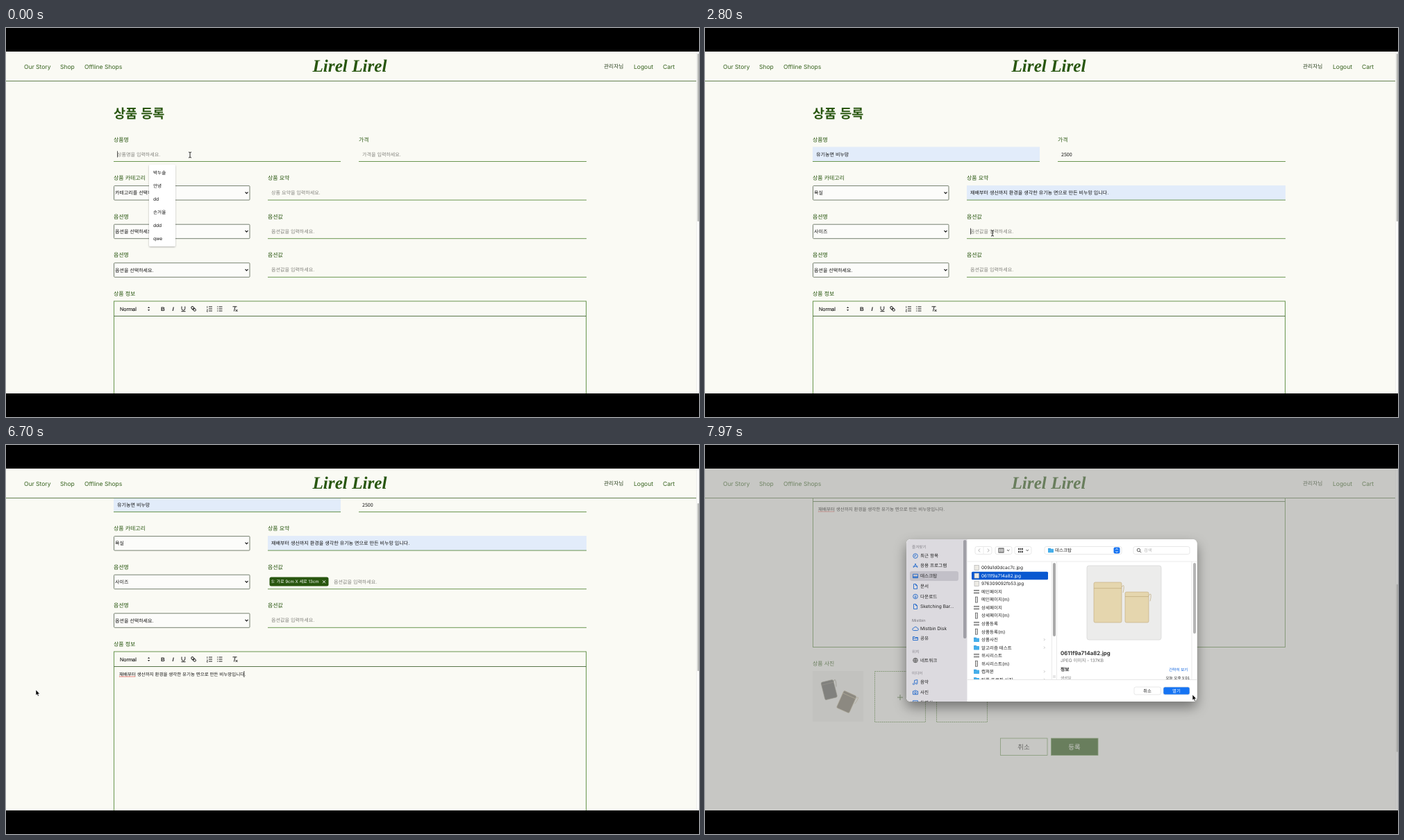
An HTML page that plays this animation: 998x561 px, repeating every 8000 ms.

```html
<!DOCTYPE html>
<html lang="ko">
<head>
<meta charset="utf-8">
<title>상품 등록</title>
<style>
  html, body { margin: 0; width: 100%; height: 100%; overflow: hidden; background: #000; }
  svg { display: block; width: 100%; height: 100%; text-rendering: geometricPrecision; }
  text { white-space: pre; }
</style>
</head>
<body>
<svg id="stage" viewBox="0 0 998 561"></svg>
<script>
const LOOP = 8000;
const KR = "'Noto Sans CJK KR', 'Noto Sans CJK JP', sans-serif";
const UI = "Inter, 'Noto Sans CJK KR', sans-serif";
const GREEN = '#28560f', LINE = '#6a9650', PAPER = '#fafaf4', BLUE = '#0a60dc';
const stage = document.getElementById('stage');
const ruler = document.createElement('canvas').getContext('2d');

// Drawing helpers; text is placed by its vertical centre.
const text = (x, y, str, size = 7, fill = '#111', { font = KR, weight = 400, anchor = 'start', extra = '' } = {}) =>
  `<text x="${x}" y="${y + size * .36}" font-size="${size}" fill="${fill}" font-family="${font}" font-weight="${weight}" text-anchor="${anchor}" ${extra}>${str}</text>`;
const rect = (x, y, w, h, fill = 'none', extra = '') =>
  `<rect x="${x}" y="${y}" width="${w}" height="${h}" fill="${fill}" ${extra}/>`;
const path = (d, stroke = '#222', width = 1, extra = '') =>
  `<path d="${d}" fill="none" stroke="${stroke}" stroke-width="${width}" ${extra}/>`;
const at = (x, y, body) => `<g transform="translate(${x} ${y})">${body}</g>`;
const textWidth = (str, size) => { ruler.font = `${size}px ${KR}`; return ruler.measureText(str).width; };
const caret = (x, y) => path(`M${x} ${y - 4.5}v9`, '#222', .8);
const ease = k => k * k * (3 - 2 * k);
const clamp01 = k => Math.min(1, Math.max(0, k));

// Successive screen states while typing Hangul with a two-set keyboard.
const LEADS = 'ㄱㄲㄴㄷㄸㄹㅁㅂㅃㅅㅆㅇㅈㅉㅊㅋㅌㅍㅎ';
const TAILS = 'ㄱㄲㄳㄴㄵㄶㄷㄹㄺㄻㄼㄽㄾㄿㅀㅁㅂㅄㅅㅆㅇㅈㅊㅋㅌㅍㅎ';
function keystrokes(str) {
  const states = [];
  let done = '', open = false;
  for (const ch of str) {
    const n = ch.charCodeAt(0) - 0xAC00;
    if (n < 0 || n > 11171) { states.push(done + ch); open = false; }
    else {
      const lead = LEADS[Math.floor(n / 588)], tail = n % 28;
      const borrowed = TAILS.indexOf(lead) + 1;
      states.push(open && borrowed
        ? done.slice(0, -1) + String.fromCharCode(done.charCodeAt(done.length - 1) + borrowed)
        : done + lead);
      states.push(done + String.fromCharCode(0xAC00 + n - tail));
      if (tail) states.push(done + ch);
      open = !tail;
    }
    done += ch;
  }
  return states;
}
const typedAt = (states, t, start, step) =>
  t < start ? '' : states[Math.min(states.length - 1, Math.floor((t - start) / step))];

const SUMMARY = '재배부터 생산까지 환경을 생각한 유기농 면으로 만든 비누망 입니다.';
const SIZE = 'S: 가로 9cm X 세로 13cm';
const storyKeys = keystrokes(SUMMARY.replace(' 입', '입'));
const sizeKeys = keystrokes(SIZE);
const priceKeys = keystrokes('2500');

// time, x, y, pointer: I = text beam, A = arrow, - = hidden
const POINTER = [
  [0, 265, 183, 'I'], [300, 265, 183, 'A'], [430, 226, 209, 'A'], [620, 226, 209, 'A'],
  [920, 528, 180, 'I'], [1400, 528, 180, 'A'], [1580, 250, 238, 'A'], [1850, 230, 250, 'A'],
  [2030, 430, 238, 'I'], [2300, 430, 240, 'A'], [2430, 250, 293, 'A'], [2600, 250, 296, 'A'],
  [2740, 414, 296, 'I'], [2900, 414, 296, '-'], [3800, 414, 296, 'I'], [4200, 414, 300, 'I'],
  [4400, 320, 340, 'I'], [4800, 320, 340, '-'], [6590, 150, 345, 'A'], [6670, 43, 353, 'A'],
  [6830, 43, 353, 'A'], [6950, 191, 364, 'A'], [7030, 191, 364, 'A'], [7150, 440, 177, 'A'],
  [7260, 440, 177, 'A'], [7400, 680, 354, 'A'], [7450, 680, 354, 'A'], [7580, 280, 364, 'A'],
  [7650, 280, 364, 'A'], [7760, 430, 188, 'A'], [7800, 430, 188, 'A'], [7900, 682, 354, 'A'],
  [7970, 702, 360, 'A'], [8000, 702, 360, 'A']
];
function pointer(t) {
  const i = POINTER.findIndex((p, n) => t >= p[0] && t < POINTER[n + 1][0]);
  const [t0, x0, y0, kind] = POINTER[i], [t1, x1, y1] = POINTER[i + 1];
  if (kind === '-') return '';
  const k = ease((t - t0) / (t1 - t0));
  const shape = kind === 'I'
    ? path('M-2-4Q0-4 0-3Q0-4 2-4M0-3V3M-2 4Q0 4 0 3Q0 4 2 4', '#111', .9)
    : '<path d="M0 0V8L1.8 6.4L3 9.2L4.4 8.6L3.2 5.9H5.6Z" fill="#000" stroke="#fff" stroke-width=".6"/>';
  return at(x0 + (x1 - x0) * k, y0 + (y1 - y0) * k, shape);
}

function header() {
  const nav = (x, s) => text(x, 55.5, s, 8.5, '#37631f', { font: UI });
  return rect(0, 34, 998, 43, PAPER) + path('M0 76.5H994', '#648052', 1) +
    nav(26, 'Our Story') + nav(78, 'Shop') + nav(113, 'Offline Shops') + nav(904, 'Logout') + nav(946, 'Cart') +
    text(861, 55.5, '관리자님', 7.7, '#2c4320', { weight: 500 }) +
    text(495, 54, 'Lirel Lirel', 25.2, GREEN,
      { font: "'Liberation Serif', serif", weight: 700, anchor: 'middle', extra: 'font-style="italic"' });
}

const label = (x, y, s) => text(x, y, s, 7.9, GREEN, { weight: 500 });
function field(x, y, w, { hint, value = '', filled, focus, indent = 5 }) {
  const shown = value || hint;
  return (filled ? rect(x, y - 10.5, w, 21, '#e2ecfa') : '') +
    path(`M${x} ${y + 10.5}h${w}`, LINE, 1) +
    text(x + indent, y, shown, 7.05, value ? '#111' : '#85857f') +
    (focus ? caret(x + indent + .5 + textWidth(value, 7.05), y) : '');
}
const select = (y, s) =>
  rect(155.5, y - 10, 195.5, 20.5, '#fcfcfa', 'stroke="#768070" rx="1"') +
  text(157, y + .3, s, 7, '#111') + path(`M344.5 ${y - 1}l2 2l2-2`, '#111', 1.2);

function toolbar() {
  const icon = (x, s, extra) =>
    text(x, 405, s, 8, '#222', { font: "'Liberation Sans', sans-serif", weight: 700, anchor: 'middle', extra });
  const list = x => path(`M${x + 3} 402h5M${x + 3} 405h5M${x + 3} 408h5`, '#222', 1);
  return rect(155.5, 394, 680, 231.5, 'none', `stroke="${LINE}"`) +
    path('M155 415.5H836', '#59764a', 1) +
    text(164, 405, 'Normal', 7.4, '#222', { font: "'Liberation Sans', sans-serif", extra: 'stroke="#222" stroke-width=".15"' }) +
    '<path d="M204 404l1.6-2l1.6 2zM204 406l1.6 2l1.6-2z" fill="#222"/>' +
    icon(226, 'B') + icon(240.5, 'I', 'font-style="italic"') +
    path('M253 401.5v3.2q0 2.5 2.4 2.5t2.4-2.5v-3.2M252.5 408.7h6') +
    `<g transform="rotate(45 270 405)">${rect(266, 403.3, 4.5, 3.2, 'none', 'rx="1.6" stroke="#222"')}${rect(269.5, 403.3, 4.5, 3.2, 'none', 'rx="1.6" stroke="#222"')}</g>` +
    list(289) + path('M289.8 401v3M289 406h1.5l-1.5 3h2', '#222', .7) +
    list(303.5) + path('M304 402h1.2M304 405h1.2M304 408h1.2', '#222', 1.2) +
    path('M326.5 401.8h6M330 402l-1.6 6.5M330.5 406l3 3m0-3l-3 3');
}

function story(t) {
  const s = typedAt(storyKeys, t, 4850, 22);
  const busy = t < 4850 + storyKeys.length * 22 && /[^ .]$/.test(s);
  const end = 163 + textWidth(s, 6.5);
  const last = busy ? textWidth(s.slice(-1), 6.5) : 0;
  return text(163, 426.5, s, 6.5, '#111') +
    (busy ? path(`M${end - last} 430h${last}`, '#111', .7) : '') +
    (s.includes(' ') ? path('M163 430h23.5', '#e0342c', 1.1, 'stroke-dasharray="1.3 .8"') : '') +
    (!busy && t > 4450 && t < 6950 ? caret(end + .5, 426.5) : '');
}

const pouch = (x, y, w, h, fill, edge) =>
  rect(x, y, w, h, fill, `rx="2" stroke="${edge}" stroke-width=".6"`) +
  path(`M${x} ${y + h * .15}h${w}M${x + w} ${y + h * .12}q4-6 3 3l-1 5`, edge, .7);
const darkPouches = () =>
  `<g transform="rotate(-14 24 28)">${pouch(15, 14, 18, 26, '#5d5d58', '#8b8774')}</g>` +
  `<g transform="rotate(24 49 44)">${pouch(39, 31, 20, 27, '#77705f', '#c3b893')}</g>`;

function page(t) {
  const photo = t >= 7450;
  const tagged = t >= 3730;
  const drop = photo ? 2 : 0;
  const box = x => rect(x + .5, 660.5, 73, 73, 'none', `stroke="${LINE}" stroke-dasharray="2 1"`) +
    path(`M${x + 33} 698h8m-4-4v8`, '#55793f', 1);
  const button = (x, s, fill, color) =>
    rect(x + .5, 755 + drop, 67.5, 24.5, fill, `stroke="${LINE}" stroke-width=".8"`) +
    text(x + 34, 767.5 + drop, s, 9.4, color, { anchor: 'middle' });
  return text(155, 123.5, '상품 등록', 18.5, GREEN, { weight: 700 }) +
    label(155, 161, '상품명') + label(508, 161, '가격') +
    field(155, 182, 327, { hint: '상품명을 입력하세요.', value: t >= 600 ? '유기농면 비누망' : '', filled: t >= 600, focus: t < 900 }) +
    field(508, 182, 328, { hint: '가격을 입력하세요.', value: typedAt(priceKeys, t, 1150, 70), focus: t >= 920 && t < 1580 }) +
    label(155, 216.5, '상품 카테고리') + label(377, 216.5, '상품 요약') +
    select(237.6, t >= 1850 ? '욕실' : '카테고리를 선택하세요.') +
    field(377, 237.6, 459, { hint: '상품 요약을 입력하세요.', value: t >= 2270 ? SUMMARY : '', filled: t >= 2270, focus: t >= 2030 && t < 2430 }) +
    label(155, 272, '옵션명') + label(377, 272, '옵션값') +
    select(293.2, t >= 2600 ? '사이즈' : '옵션을 선택하세요.') +
    field(377, 293.2, 459, {
      hint: '옵션값을 입력하세요.', value: tagged ? '' : typedAt(sizeKeys, t, 2920, 28),
      focus: t >= 2740 && t < 4400, indent: tagged ? 95 : 5
    }) +
    (tagged ? rect(379.5, 286.5, 85, 13, GREEN, 'rx="2.5"') +
      text(382, 292.7, SIZE, 6.1, '#fff', { font: UI }) + path('M456 291.3l4 4m0-4l-4 4', '#fff', .9) : '') +
    label(155, 327.6, '옵션명') + label(377, 327.6, '옵션값') +
    select(348.8, '옵션을 선택하세요.') + field(377, 348.8, 459, { hint: '옵션값을 입력하세요.' }) +
    label(155, 383, '상품 정보') + toolbar() + story(t) +
    label(155, 649.5, '상품 사진') +
    (photo ? at(155, 660, rect(0, 0, 73, 73, '#eeeeea') + darkPouches()) : box(155)) + box(244) + box(333) +
    button(425, '취소', PAPER, '#222') + button(498, '등록', '#28560f', '#fff');
}

function suggestions(x, w, items) {
  return rect(x, 197, w, 118, '#fff', 'rx="2" filter="url(#soft)"') +
    items.map((s, i) => text(x + 6, 209 + i * 18.85, s, 6.6, '#111', { font: UI })).join('');
}

const ICONS = {
  clock: 'M3.3 0A3.3 3.3 0 1 1 -3.3 0A3.3 3.3 0 1 1 3.3 0M0-2V.3H-1.8',
  apps: 'M-3 3L.6-3M3 3L-.6-3M-3.5 1h7',
  desk: 'M-3.5-2.7h7v5.4h-7zM-3.5 1h7M-3.5 1.7h7',
  doc: 'M-2.5-3.5h3l2 2v5h-5zM.5-3.5v2h2',
  down: 'M3.3 0A3.3 3.3 0 1 1 -3.3 0A3.3 3.3 0 1 1 3.3 0M0-1.8V1.7M-1.4.4L0 1.8L1.4.4',
  cloud: 'M-2.5 2.5h5a1.7 1.7 0 0 0 .2-3.4a2.6 2.6 0 0 0-4.9-.2a1.8 1.8 0 0 0-.3 3.6z',
  folder: 'M-3.5-2.5h2.5l1 1h3.5v4h-7zM-3.5-.3h7',
  globe: 'M3.3 0A3.3 3.3 0 1 1 -3.3 0A3.3 3.3 0 1 1 3.3 0M-3.3 0h6.6M0-3.3v6.6M-2.6-1.8h5.2M-2.6 1.8h5.2',
  note: 'M-1.3 2.6V-2.6L2.8-3.4V1.8M-1.3 2.6a1.2 1 0 1 1-1.2-1M2.8 1.8a1.2 1 0 1 1-1.2-1',
  camera: 'M-3.5-2h1.8l.8-1h1.8l.8 1h1.8v4.7h-7zM1.4.3A1.4 1.4 0 1 1-1.4.3A1.4 1.4 0 1 1 1.4.3'
};
const SIDEBAR = [
  [147, '즐겨찾기'], [160, '최근 항목', 'clock'], [174, '응용 프로그램', 'apps'], [189, '데스크탑', 'desk'],
  [204, '문서', 'doc'], [218.5, '다운로드', 'down'], [233, 'Sketching Bar...', 'doc'],
  [253, 'Mistbin'], [265, 'Mistbin Disk', 'cloud'], [279, '공유', 'folder'],
  [298, '위치'], [310.5, '네트워크', 'globe'],
  [329, '미디어'], [342, '음악', 'note'], [357, '사진', 'camera'], [371.5, '동영상', 'desk']
];
// A trailing slash marks a folder.
const FILES = ['009a1d0dcac7c.jpg', '0611f9a714a82.jpg', '976309092fb53.jpg', '메인페이지', '메인페이지(m)',
  '상세페이지', '상세페이지(m)', '상품등록', '상품등록(m)', '상품사진/', '알고리즘 테스트/',
  '위시리스트', '위시리스트(m)', '캡쳐본/', '팀플 프로필 사진/'];

const folder = (x, y) => rect(x - 4, y - 3, 4, 2, '#2d8fd2') + rect(x - 4, y - 2.2, 8, 5.4, '#45aeea', 'rx=".6"');
function fileIcon(y, name) {
  if (name.endsWith('/')) return folder(391, y);
  if (name.endsWith('.jpg')) return rect(388, y - 3.5, 6.5, 7, '#eceae4', 'stroke="#aaa" stroke-width=".6"');
  return name.endsWith('(m)')
    ? rect(389.5, y - 4, 3, 8, '#ddd', 'stroke="#555" stroke-width=".7"')
    : rect(387, y - 2, 8, 4, '#ddd') + path(`M387 ${y - 2}h8M387 ${y + 2}h8`, '#444', .9);
}

function sidebar() {
  return rect(290, 136, 87.5, 234, '#dcdadf') + rect(295, 182, 70, 14, '#c2c0c8', 'rx="3"') +
    SIDEBAR.map(([y, s, icon]) => icon
      ? at(303, y, path(ICONS[icon], icon === 'globe' ? '#666' : '#2269cb', .9)) + text(310, y, s, 6.6, '#222', { font: UI })
      : text(298, y, s, 5.6, '#85838a', { font: UI, weight: 500 })).join('') +
    rect(372, 137, 4.5, 142, '#a09fa6', 'rx="2"');
}

function preview(index) {
  const name = FILES[index];
  const picture = index
    ? pouch(560, 198, 40, 58, '#e5d6ae', '#bfa97a') + pouch(605, 212, 34, 44, '#e5d6ae', '#bfa97a')
    : at(562, 185, `<g transform="scale(1.2)">${darkPouches()}</g>`);
  return rect(550, 174, 107, 107, '#ececeb', 'rx="3" stroke="#d4d4d4" stroke-width=".7"') + picture +
    text(512, 300, name, 7.9, '#222', { font: UI, weight: 600 }) +
    text(512, 311, 'JPEG 이미지 - 137KB', 6.5, '#777', { font: UI }) +
    text(512, 323.7, '정보', 6.8, '#222', { weight: 700 }) +
    text(695.5, 324, '간략히 보기', 5.6, BLUE, { anchor: 'end' }) +
    text(512, 335.5, '생성일', 5.6, '#777') +
    text(698, 335.5, '오늘 오후 9:01', 5.6, '#222', { anchor: 'end' }) +
    path('M701 168V338', '#e4e4e4', .8) + rect(703, 170, 4, 102, '#b5b5b5', 'rx="2"');
}

function dialog(selected) {
  const picked = selected >= 0;
  const rows = FILES.map((name, i) => {
    const y = 177 + i * 11.52, on = i === selected;
    return (on ? rect(384, y - 5.7, 110, 11.4, '#0958d0', 'rx="1.5"') : '') + fileIcon(y, name) +
      text(398, y, name.replace('/', ''), 6.5, on ? '#fff' : '#222', { font: UI }) +
      (name.endsWith('/') ? path(`M488 ${y - 1.5}l1.5 1.5l-1.5 1.5`, '#aaa', .7) : '');
  }).join('');
  const pill = (x, y, w, h, fill = '#fff') => rect(x, y, w, h, fill, 'rx="2.5" stroke="#dedede" stroke-width=".7"');
  const chevron = x => path(`M${x} 151l1.7 1.7l1.7-1.7`, '#444', 1);
  return rect(290, 136, 418.5, 234, '#fff', 'rx="6" filter="url(#deep)"') +
    `<g clip-path="url(#dialogClip)">${rect(290, 136, 419, 235, '#fff')}${sidebar()}` +
    pill(389, 146.5, 24, 11) + path('M401 147v10', '#e2e2e2', .7) +
    path('M396 149.5l-2.2 2.5l2.2 2.5M407 149.5l2.2 2.5l-2.2 2.5', '#aaa', .9) +
    pill(418, 146.5, 24, 11) + rect(423, 149, 7, 6, 'none', 'stroke="#444"') + path('M425.3 149v6M427.7 149v6', '#444', .8) + chevron(435) +
    pill(446, 146.5, 24, 11) + path('M451 150h7M451 154h7', '#444', 2.3, 'stroke-dasharray="1.8 .8"') + chevron(462.5) +
    pill(489, 146.5, 111, 11) + folder(498, 152) + text(504, 152, '데스크탑', 6.5, '#222') +
    rect(588.5, 147.5, 9, 9, '#1874f2', 'rx="2"') + path('M591.4 151l1.6-1.7l1.6 1.7M591.4 153l1.6 1.7l1.6-1.7', '#fff', .9) +
    pill(617, 146.5, 81, 11) + `<circle cx="624.5" cy="151.5" r="2.2" fill="none" stroke="#444" stroke-width=".9"/>` +
    path('M626.2 153.2l2 2', '#444', .9) + text(632, 152, '검색', 6.3, '#b5b5b5') +
    path('M378 168H709', '#e7e7e7', .8) +
    `<g clip-path="url(#listClip)">${rows}${path('M499.5 168V338M506.5 168V338', '#e4e4e4', .8)}${rect(501, 170, 4, 106, '#aaa', 'rx="2"')}` +
    path('M502 332v4M504 332v4', '#bbb', .7) +
    (picked ? preview(selected) : path('M627.5 168V338M635 168V338', '#e4e4e4', .8)) + '</g>' +
    path('M378 338.5H709', '#e0e0e0', .8) +
    pill(618, 349, 38.5, 11) + text(637, 354.3, '취소', 6.4, '#222', { anchor: 'middle' }) +
    pill(660, 349, 38, 11, picked ? '#1674f3' : '#fafafa') +
    text(679, 354.3, '열기', 6.4, picked ? '#fff' : '#b8b8b8', { anchor: 'middle' }) + '</g>';
}

const DEFS = `<defs>
  <clipPath id="pageClip"><rect x="0" y="77" width="998" height="450"/></clipPath>
  <clipPath id="dialogClip"><rect x="290" y="136" width="418.5" height="234" rx="6"/></clipPath>
  <clipPath id="listClip"><rect x="378" y="168" width="331" height="170"/></clipPath>
  <filter id="soft" x="-30%" y="-20%" width="160%" height="140%"><feDropShadow dx="0" dy="1" stdDeviation="1.2" flood-opacity=".3"/></filter>
  <filter id="deep" x="-20%" y="-20%" width="140%" height="150%"><feDropShadow dx="0" dy="8" stdDeviation="9" flood-opacity=".42"/></filter>
</defs>`;

function draw() {
  const t = performance.now() % LOOP;
  const scroll = 96 * ease(clamp01((t - 3930) / 200)) + 238 * ease(clamp01((t - 6710) / 130));
  const first = t >= 7030 && t < 7450, second = t >= 7650;
  let out = DEFS + rect(0, 34, 998, 493, PAPER) +
    `<g clip-path="url(#pageClip)">${at(0, -scroll, page(t))}</g>` + header() +
    rect(994, 34, 4, 493, '#fcfcfb') + path('M994.5 34V527', '#e9e9e6', .7) +
    rect(995.7, 37 + scroll * .49, 2.3, 242, '#b9bab7', 'rx="1"');
  if (t < 550) out += suggestions(206, 38, ['박누솔', '안녕', 'dd', '손거울', 'ddd', 'qwe']);
  if (t >= 920 && t < 1150) out += suggestions(560, 44, ['123', '1213', '1234', '123123', '1000', '300만원']);
  if (first || second) {
    out += rect(0, 34, 998, 493, '#9f9f9d', 'fill-opacity=".55"') +
      dialog(first ? (t >= 7260 ? 0 : -1) : (t >= 7770 ? 1 : -1));
  }
  stage.innerHTML = out + pointer(t) + rect(0, 0, 998, 34, '#000') + rect(0, 527, 998, 34, '#000');
  requestAnimationFrame(draw);
}
draw();
</script>
</body>
</html>
```
